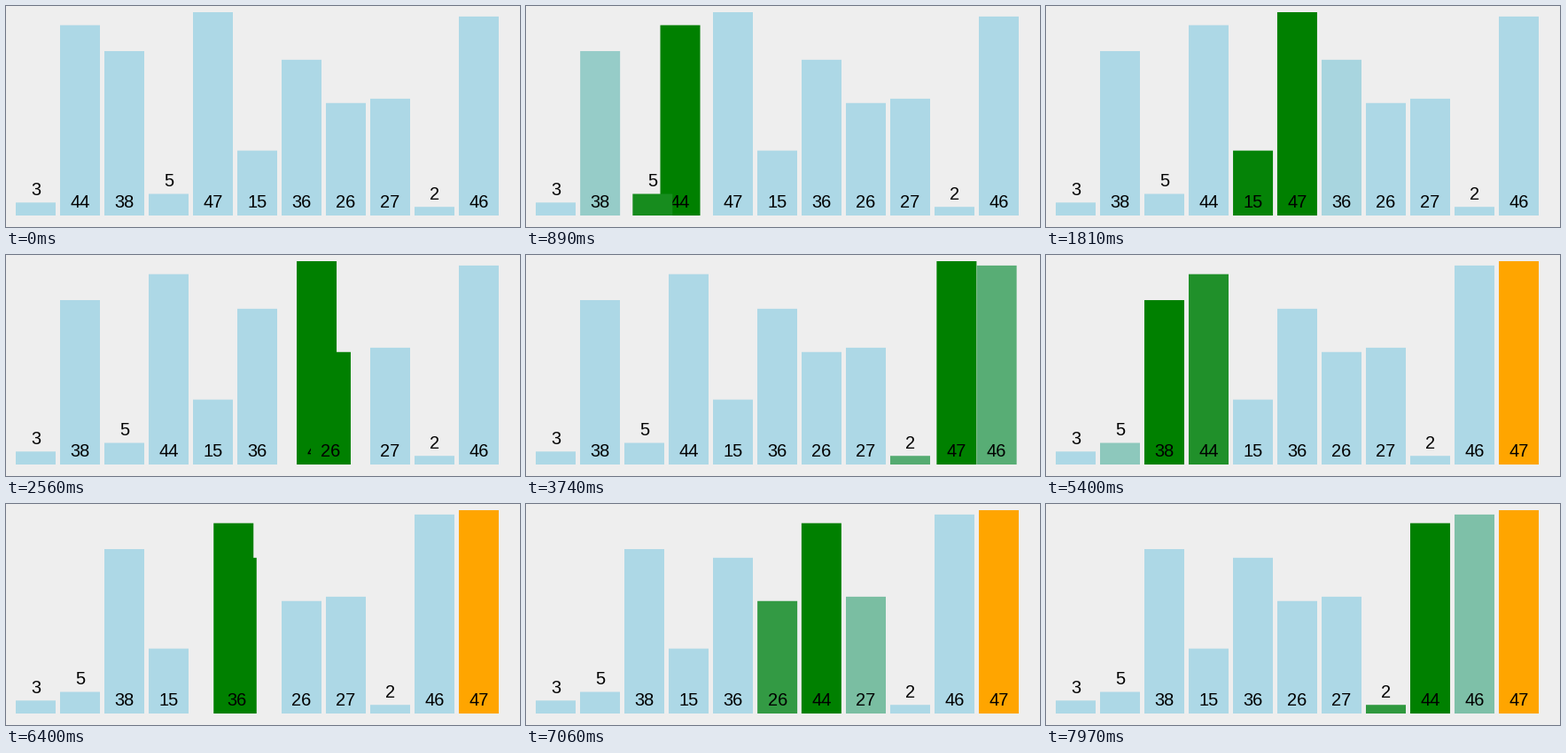
Animation, 580 px wide and 250 px high, one loop 8000 ms. Source, as a matplotlib script:

```python
import numpy as np
import matplotlib.pyplot as plt
from matplotlib.animation import FuncAnimation
from matplotlib.colors import to_rgb
from matplotlib.patches import Rectangle

W, H, DPI = 580, 250, 100
LOOP, STEP = 8000, 20
BASE, LEFT, PITCH, BAR = 237, 11, 50, 45
SCALE = 230 / 47
TEXT_GAP = 8.6

VALUES = [3, 44, 38, 5, 47, 15, 36, 26, 27, 2, 46]
BLUE, GREEN, ORANGE = (np.array(to_rgb(c)) for c in ("lightblue", "green", "orange"))

# Steps follow a slightly uneven beat, given by a few (step, ms) points.
# Some steps of each round come early and interrupt the one before.
FADE, LEAD = 250, 100
BEAT = [(0, 0), (4, 820), (11, 2450), (17, 3783), (20, 4453), (27, 6278), (34, 7858)]
ROUND, EARLY = 18, (4, 6, 13, 15, 17)


def start_time(k):
    return np.interp(k, *zip(*BEAT)) - LEAD * (k % ROUND in EARLY)


def state(order, lit, done):
    """One row per bar: x, r, g, b."""
    rows = np.zeros((len(order), 4))
    for slot, bar in enumerate(order):
        color = ORANGE if bar in done else GREEN if bar in lit else BLUE
        rows[bar] = [LEFT + PITCH * slot, *color]
    return rows


def bubble_sort():
    order, done = list(range(len(VALUES))), set()
    for last in range(len(order) - 1, 0, -1):
        for i in range(last):
            pair = order[i:i + 2]
            yield state(order, pair, done)
            if VALUES[pair[0]] > VALUES[pair[1]]:
                order[i:i + 2] = pair[::-1]
                yield state(order, pair, done)
        yield state(order, pair, done)
        done.add(order[last])
        yield state(order, (), done)


def ease(u):
    u = min(max(u, 0), 1)
    return 4 * u ** 3 if u < 0.5 else 1 - 4 * (1 - u) ** 3


def blend(step, t):
    start, a, b = step
    return a + (b - a) * ease((t - start) / FADE)


def build_steps():
    rest = state(range(len(VALUES)), (), ())
    steps = [(0, rest, rest)]
    for k, goal in zip(range(BEAT[-1][0] + 1), bubble_sort()):
        start = start_time(k)
        steps.append((start, blend(steps[-1], start), goal))
    return steps


steps = build_steps()

fig = plt.figure(figsize=(W / DPI, H / DPI), dpi=DPI, facecolor="#eeeeee")
ax = fig.add_axes([0, 0, 1, 1])
ax.set_xlim(0, W)
ax.set_ylim(H, 0)
ax.axis("off")

bars, labels = [], []
for n, value in enumerate(VALUES):
    height = value * SCALE
    top = BASE - height
    bars.append(ax.add_patch(Rectangle((0, top), BAR, height, lw=0,
                                       snap=False, zorder=2 * n + 1)))
    text_y = (top if height < 30 else BASE) - TEXT_GAP
    labels.append(ax.text(0, text_y, str(value), ha="center", va="baseline",
                          family="Liberation Sans", size=20 * 72 / DPI,
                          color="black", zorder=2 * n + 2))


def update(frame):
    t = frame * STEP
    current = [s for s in steps if s[0] <= t][-1]
    for bar, label, (x, *color) in zip(bars, labels, blend(current, t)):
        bar.set_x(x)
        bar.set_facecolor(np.clip(color, 0, 1))
        label.set_x(x + BAR / 2)
    return bars + labels


anim = FuncAnimation(fig, update, frames=LOOP // STEP, interval=STEP,
                     repeat=True, repeat_delay=0)
plt.show()
```
